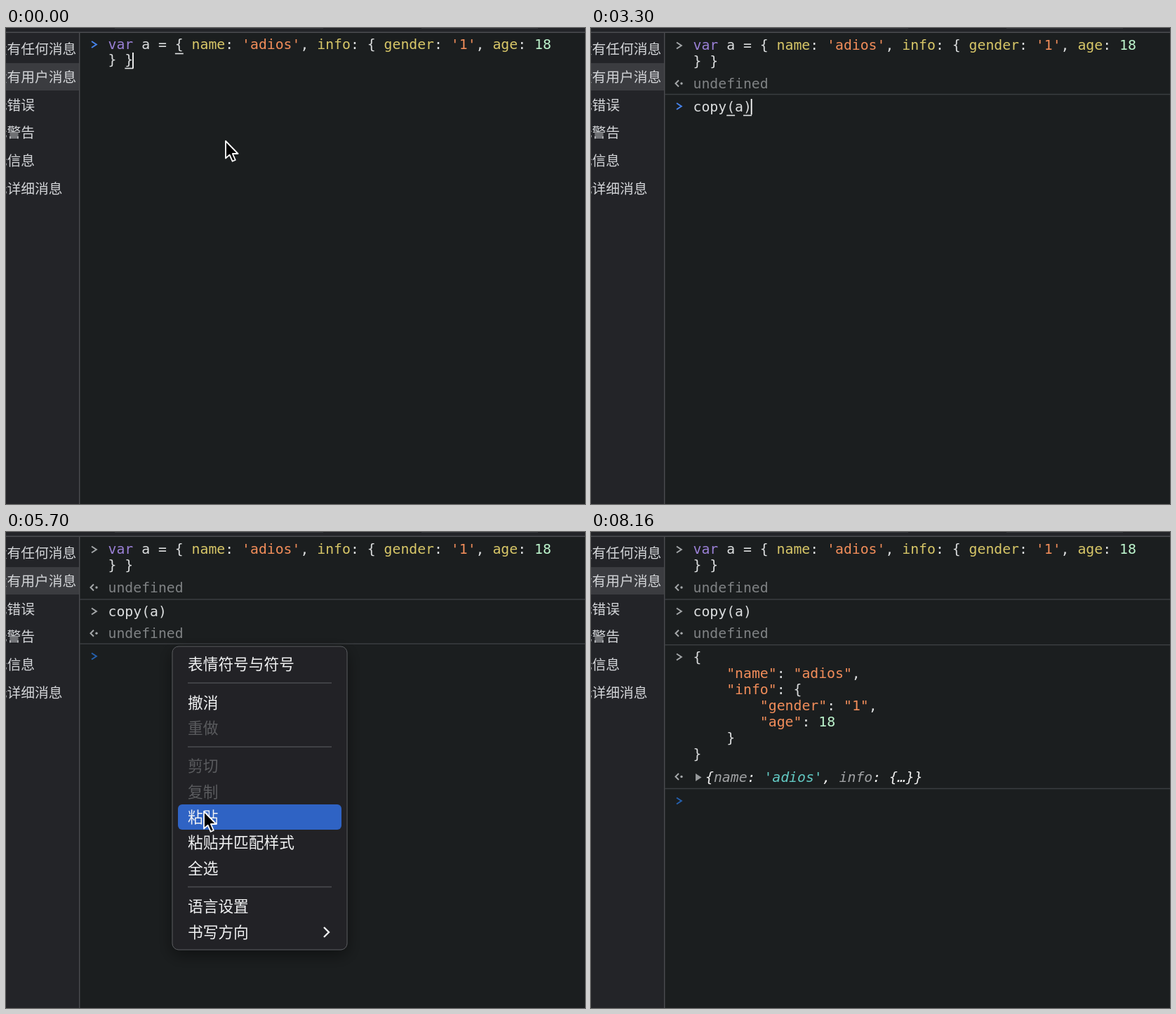
An HTML page for the animation above (8.22 s loop, 825 by 678 pixels).

```html
<!DOCTYPE html>
<html lang="zh-CN">
<head>
<meta charset="utf-8">
<title>Console copy</title>
<style>
html, body { margin: 0; width: 100%; height: 100%; overflow: hidden; background: #1b1e1f; }
svg { display: block; width: 825px; height: 678px; }
text { white-space: pre; }
.code { font: 19.8px "DejaVu Sans Mono", monospace; fill: #dcdedf; }
.key { fill: #9a80d6; }
.prop { fill: #d8c768; }
.str { fill: #f18d5a; }
.num { fill: #bdf5cd; }
.dim { fill: #7f8284; }
.preview { font-style: italic; fill: #f0f0f0; }
.preview .prop { fill: #a0a2a4; }
.preview .str { fill: #62c9c3; }
.side { font: 19.8px "Noto Sans CJK SC", "Noto Sans CJK", sans-serif; fill: #d3d5d8; }
.item { font: 21.7px "Noto Sans CJK SC", "Noto Sans CJK", sans-serif; fill: #f1f2f3; }
.off { fill: #5a5b5e; }
.rule { stroke: #3a3d40; stroke-width: 1.4; }
.icon { fill: none; stroke: #a4a7a9; stroke-width: 2; }
.live { stroke: #4682ea; }
.idle { stroke: #2560ad; }
.mark { stroke: #e4e6e7; stroke-width: 1.6; }
.split { stroke: #4b4c50; stroke-width: 1.5; }
.ghost .panel, .ghost .split, .ghost .icon { visibility: hidden; }
.ghost .item { fill: #16191a; }
.ghost #hover { fill: #191c1d; }
</style>
</head>
<body>
<svg id="stage" viewBox="0 0 825 678">
  <defs>
    <filter id="shadow" x="-20%" y="-20%" width="140%" height="140%">
      <feDropShadow dx="0" dy="7" stdDeviation="11" flood-color="#000" flood-opacity=".45"/>
    </filter>
  </defs>
  <rect width="825" height="678" fill="#1b1e1f"/>
  <rect width="104" height="678" fill="#232428"/>
  <rect width="825" height="6" fill="#232428"/>
  <path d="M155 0H452M592 0H758" stroke="#4b4c50"/>
  <path d="M0 6.3H825M104.7 6V678" stroke="#4b4c50" stroke-width="1.4"/>
  <rect y="50" width="104" height="39" fill="#3b3c40"/>
  <g id="sidebar"></g>
  <g id="console"></g>
  <g id="marks"></g>
  <text id="typed" class="code" x="145.5" y="118.7"></text>
  <rect id="caret" width="1.8" height="22.5" fill="#fff"/>
  <g id="menu">
    <rect class="panel" x="237" y="163" width="249" height="432" rx="9" fill="#202125" stroke="#595b5e" filter="url(#shadow)"/>
    <rect id="hover" x="245" y="388" width="233" height="36" rx="6" fill="#2f63c4"/>
    <path class="split" d="M259 215H464M259 306H464M259 505.5H464"/>
    <path class="icon" d="M453 563L460 570L453 577" style="stroke:#f1f2f3;stroke-width:2.4"/>
  </g>
  <path id="mouse" d="M0 0V24.5L5.6 19.6L9.7 28.8L13.8 27L9.8 18H17.5Z" fill="#000" stroke="#fff" stroke-width="1.8" stroke-linejoin="round"/>
</svg>
<script>
const LOOP = 8220, BLINK = 540, LEFT = 145.5, COL = 11.92;
const ENTER = [480, 3600, 7140], TYPE = 1740, KEY = 80;
const OPEN = 4860, CLOSE = 5820, GONE = 5960, PASTE = 6000;
const $ = id => document.getElementById(id);
const at = col => LEFT + col * COL;

// Syntax colouring: strings, keyword, property names, numbers
const paint = s => s.replace(/("[^"]*"|'[^']*')|\b(var)\b|(\w+)(?=:)|(\d+)/g,
  (m, str, key, prop) => `<tspan class="${str ? 'str' : key ? 'key' : prop ? 'prop' : 'num'}">${m}</tspan>`);

const text = (cls, x, y, s) => `<text class="${cls}" x="${x}" y="${y}">${s}</text>`;
const code = (y, step, lines) => lines.map((s, i) =>
  text('code', at(s.search(/\S/)), y + i * step, paint(s.trim()))).join('');
const rule = y => `<path class="rule" d="M105 ${y}H825"/>`;
const prompt = (y, cls = '') => `<path class="icon ${cls}" d="M122 ${y - 4.5}L128.8 ${y}L122 ${y + 4.5}"/>`;
const reply = y => `<path class="icon" d="M125 ${y - 4.5}L120.5 ${y}L125 ${y + 4.5}"/>
  <circle cx="129" cy="${y}" r="1.7" fill="#a4a7a9"/>`;
const undef = y => reply(y) + text('code dim', LEFT, y + 7, 'undefined');
const mark = (col, y) => `<path class="mark" d="M${at(col)} ${y}h${COL}"/>`;
const during = (from, to, body) => `<g data-from="${from}" data-to="${to}">${body}</g>`;

const assign = ["var a = { name: 'adios', info: { gender: '1', age: 18", '} }'];
const json = JSON.stringify({ name: 'adios', info: { gender: '1', age: 18 } }, null, 4).split('\n');

$('sidebar').innerHTML = ['没有任何消息', '没有用户消息', '无错误', '无警告', '无信息', '无详细消息']
  .map((s, i) => text('side', -18.3, 37.3 + i * 39.65, s)).join('');

$('console').innerHTML =
  during(0, ENTER[0], prompt(23.5, 'live') + code(30.3, 21.3, assign) + mark(8, 36.5) + mark(2, 57.5)) +
  during(ENTER[0], LOOP, prompt(25) + code(31.3, 22.7, assign) + undef(79)) +
  during(ENTER[0], ENTER[1], rule(94.5)) +
  during(ENTER[0], TYPE, prompt(111.5, 'idle')) +
  during(TYPE, ENTER[1], prompt(111.5, 'live')) +
  during(ENTER[1], LOOP, rule(96) + prompt(113) + code(119.7, 0, ['copy(a)']) + undef(144.3)) +
  during(ENTER[1], ENTER[2], rule(159.3)) +
  during(ENTER[1], PASTE, prompt(177, 'idle')) +
  during(PASTE, ENTER[2], prompt(177, 'live') + code(183.7, 21.3, json) + mark(0, 189.7) + mark(0, 317.5)) +
  during(ENTER[2], LOOP, rule(160.7) + prompt(178) + code(184.5, 23, json) + reply(348.5) +
    '<path d="M149 344L157.5 349.5L149 355Z" fill="#96999b"/>' +
    text('code preview', 163, 355.5, paint("{name: 'adios', info: {…}}")) +
    rule(365.5) + prompt(383, 'idle'));

$('marks').innerHTML = mark(4, 124.5) + '<path id="close" class="mark"/>';

$('menu').insertAdjacentHTML('beforeend', [
  ['表情符号与符号', 188], ['撤消', 243], ['重做', 279, 1], ['剪切', 333, 1], ['复制', 370, 1], ['粘贴', 406],
  ['粘贴并匹配样式', 442], ['全选', 479], ['语言设置', 533], ['书写方向', 570]
].map(([s, y, off]) => text(off ? 'item off' : 'item', 259, y + 8.3, s)).join(''));

// Caret stops: time, column, top
const stops = [[0, 3, 35], [ENTER[0], 0, 100.5]];
for (let n = 1; n <= 7; n++) stops.push([TYPE + (n - 1) * KEY, n, 101]);
stops.push([ENTER[1], 0, 166], [CLOSE, 0, 166], [PASTE, 1, 295.5], [ENTER[2], 0, 372]);

// Pointer path: time, x, y
const path = [[0, 313, 161], [4140, 313, 161], [4500, 234, 168], [4740, 234, 168],
  [OPEN, 236, 165], [5100, 281, 339], [5340, 282, 398], [LOOP, 282, 398]];

const show = (el, on) => { el.style.display = on ? '' : 'none'; };
const timed = [...document.querySelectorAll('[data-from]')];

function drawTyped(t) {
  const n = Math.max(0, Math.min(7, Math.floor((t - TYPE) / KEY) + 1));
  const on = t < ENTER[1];
  $('typed').textContent = on ? 'copy(a)'.slice(0, n) + (n === 5 || n === 6 ? ')' : '') : '';
  show($('marks'), on && n > 4);
  $('close').setAttribute('d', `M${at(n === 5 ? 5 : 6)} 124.5h${COL}`);
}

function drawCaret(t) {
  const [start, col, top] = stops.filter(s => s[0] <= t).pop();
  const lit = Math.floor((t - start) / BLINK) % 2 === 0;
  show($('caret'), lit && !(t >= OPEN && t < CLOSE));
  $('caret').setAttribute('x', LEFT - 1.2 + col * COL);
  $('caret').setAttribute('y', top);
}

function drawMouse(t) {
  show($('mouse'), t < ENTER[0] || (t >= 4140 && t < ENTER[2]));
  const i = path.findIndex(p => p[0] > t);
  const [t0, x0, y0] = path[i - 1], [t1, x1, y1] = path[i];
  const p = (t - t0) / (t1 - t0), k = p * p * (3 - 2 * p);
  $('mouse').setAttribute('transform', `translate(${x0 + (x1 - x0) * k} ${y0 + (y1 - y0) * k})`);
}

function draw(now) {
  const t = now % LOOP;
  timed.forEach(el => show(el, t >= +el.dataset.from && t < +el.dataset.to));
  drawTyped(t);
  drawCaret(t);
  show($('menu'), t >= OPEN && t < GONE);
  $('menu').setAttribute('class', t >= CLOSE ? 'ghost' : '');
  show($('hover'), t >= 5220);
  drawMouse(t);
}

const begin = performance.now();
function tick() {
  draw(performance.now() - begin);
  requestAnimationFrame(tick);
}
tick();
</script>
</body>
</html>
```
